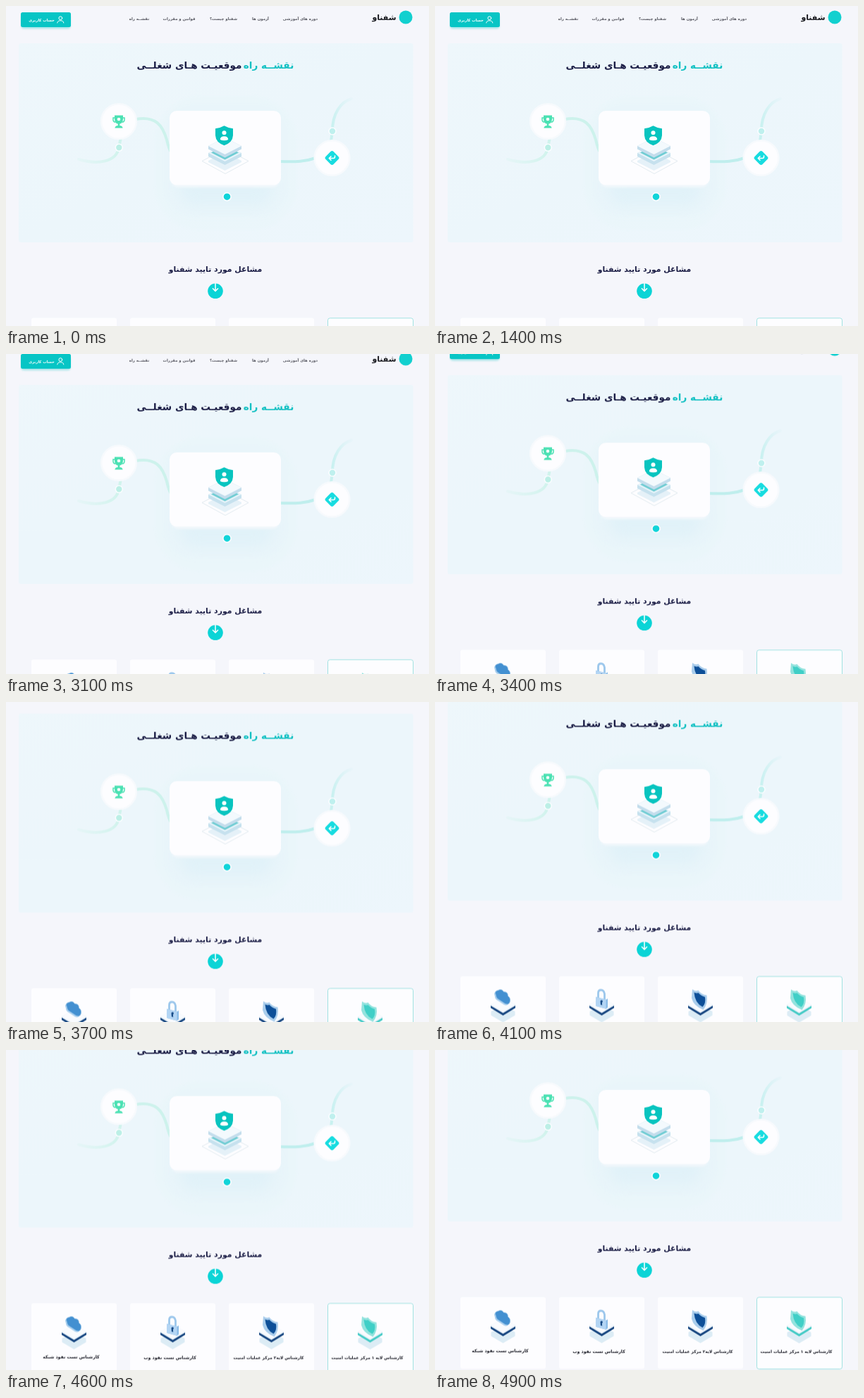
These frames come from a looping animation (600 by 455 pixels, 5 s). An HTML page:

```html
<!DOCTYPE html>
<html lang="fa">
<head>
<meta charset="utf-8">
<title>نقشه راه</title>
<style>
html, body { margin: 0; width: 100%; height: 100%; overflow: hidden; background: #f5f6fb; }
svg { display: block; width: 600px; height: 455px; }
text { font-family: "DejaVu Sans", sans-serif; font-weight: 700; direction: rtl; text-anchor: middle; fill: #1b1d45; }
.nav text { font-size: 5.4px; fill: #55565f; }
.title { font-size: 13.6px; }
.job text { font-size: 6.2px; fill: #1a1b25; }
.job .long { font-size: 5.8px; }
.card { fill: #fdfdff; }
.line { fill: none; stroke-width: 4; stroke-linecap: round; }
.white { fill: none; stroke: #fff; stroke-linecap: round; stroke-linejoin: round; }
#page { animation: scroll 5s infinite; }
@keyframes scroll {
  0% { transform: translateY(0); }
  58% { transform: translateY(0); animation-timing-function: steps(8); }
  74% { transform: translateY(-36.5px); animation-timing-function: steps(4); }
  82% { transform: translateY(-53.5px); animation-timing-function: steps(5); }
  92% { transform: translateY(-83.5px); animation-timing-function: steps(3); }
  98%, 100% { transform: translateY(-92.3px); }
}
</style>
</head>
<body>
<svg viewBox="0 0 600 455">
  <defs>
    <linearGradient id="hero" x2="1" y2="1">
      <stop offset="0" stop-color="#eef7fb"/>
      <stop offset=".5" stop-color="#ecf6fb"/>
      <stop offset="1" stop-color="#edf6fc"/>
    </linearGradient>
    <linearGradient id="fadeL" gradientUnits="userSpaceOnUse" x1="102" x2="165">
      <stop offset="0" stop-color="#d6f4ef" stop-opacity=".3"/>
      <stop offset="1" stop-color="#cff3ec"/>
    </linearGradient>
    <linearGradient id="fadeR" gradientUnits="userSpaceOnUse" x1="462" x2="492">
      <stop offset="0" stop-color="#c8f1f0"/>
      <stop offset="1" stop-color="#e0f3f8" stop-opacity=".3"/>
    </linearGradient>
    <filter id="blur" x="-50%" y="-100%" width="200%" height="300%"><feGaussianBlur stdDeviation="10"/></filter>
    <filter id="soft" x="-20%" y="-50%" width="140%" height="200%"><feGaussianBlur stdDeviation="1.8"/></filter>

    <!-- slab under each job icon; its band takes the current colour -->
    <g id="slab">
      <path d="M-17 50 0 41 17 50V55.5L0 65.5-17 55.5Z" fill="#dcecf5"/>
      <path d="M-17.5 41 0 51.5 17.5 41V45L0 55.8-17.5 45Z" fill="currentColor"/>
      <path d="M-17.5 40 0 30.5 17.5 40V41.8L0 52.3-17.5 41.8Z" fill="#e6f0f8"/>
      <path d="M-17.5 40 0 30.5 17.5 40 0 50.5Z" fill="#f9fbfe"/>
    </g>
    <g id="guard">
      <path d="M-11.5 18.5Q-7 22-3 20Q1 26 9 27Q11 39 4 47.5Q-10 42-12.5 31Z"/>
      <path d="M-9 23Q-5 24.5-3 23.5Q1 28 6.5 29.5Q8 39 3 43.5Q-8 38-9 23Z" fill="currentColor"/>
    </g>
    <rect id="tile" width="121" height="102" rx="3"/>
  </defs>

  <g id="page">
    <!-- header -->
    <rect x="22" y="13" width="69" height="19" rx="3" fill="#07c5c5" opacity=".4" filter="url(#soft)"/>
    <rect x="21" y="9" width="71" height="21" rx="2.5" fill="#07c5c5"/>
    <text x="50.5" y="21.6" font-size="5.3" style="fill:#fff">حساب کاربری</text>
    <circle cx="77.3" cy="17.2" r="2.4" class="white" stroke-width="1"/>
    <path d="M72.8 24Q73 20.8 77.3 20.8T81.8 24" class="white" stroke-width="1"/>
    <g class="nav">
      <text x="189" y="19.5">نقشــه راه</text>
      <text x="245.5" y="19.5">قوانین و مقررات</text>
      <text x="308.5" y="19.5">شفناو چیست؟</text>
      <text x="361" y="19.5">آزمون ها</text>
      <text x="417.5" y="19.5">دوره های آموزشی</text>
    </g>
    <text x="536.5" y="19.5" font-size="11" style="fill:#17181d">شفناو</text>
    <circle cx="567" cy="16" r="9.5" fill="#12d0cf"/>

    <!-- hero -->
    <rect x="18" y="53" width="559.5" height="283" rx="3" fill="url(#hero)"/>
    <text class="title" x="372.5" y="88.5" style="fill:#14c1c3">نقشــه راه</text>
    <text class="title" x="260" y="88.5">موقعیـت هـای شغلــی</text>

    <rect x="210" y="127" width="204" height="193" rx="66" fill="#e9f6fa" opacity=".45" filter="url(#soft)"/>
    <rect x="222" y="138" width="180" height="162" rx="42" fill="#e8f5fa" opacity=".4" filter="url(#soft)"/>
    <rect x="246" y="228" width="132" height="56" rx="22" fill="#dcf0f8" opacity=".6" filter="url(#blur)"/>

    <path class="line" d="M103 218C130 226 157 222 160 201L163 187" stroke="url(#fadeL)"/>
    <path class="line" d="M184 161C213 156 222 170 228 190Q231 204 235 209" stroke="#cdf2ec"/>
    <path class="line" d="M388 221C412 221.8 425 221.2 441 215.5" stroke="#bfeeed"/>
    <path class="line" d="M461 192 463 178C463 153 475 136 490 132" stroke="url(#fadeR)"/>

    <rect x="234" y="156" width="154" height="102" rx="10" fill="#f2f8fc" filter="url(#soft)"/>
    <rect class="card" x="232" y="149" width="158" height="105.5" rx="10"/>

    <g class="card" stroke="#f7fafd" stroke-width="2.5">
      <circle cx="160" cy="164" r="24.8"/>
      <circle cx="462.5" cy="216" r="24.8"/>
    </g>
    <g stroke="#fafdff" stroke-width="1.6">
      <circle cx="160.3" cy="201.3" r="5" fill="#bcefe6"/>
      <circle cx="463" cy="178" r="5" fill="#bff0ee"/>
      <circle cx="313.5" cy="271.2" r="5.6" fill="#10d4d9"/>
    </g>

    <!-- trophy -->
    <g fill="#4be1b3">
      <path d="M154 155.5H166V161Q165.5 167 161.3 167.6V170.3H163Q165.3 171 165.7 173.5H154.3Q154.7 171 157 170.3H158.7V167.6Q154.5 167 154 161Z"/>
      <path d="M154 159H152V162Q152.2 165 155 165.2M166 159H168V162Q167.8 165 165 165.2" fill="none" stroke="#4be1b3" stroke-width="1.5"/>
      <circle cx="160" cy="161" r="2.3" fill="#fdfdff"/>
    </g>

    <!-- signpost -->
    <rect x="454.7" y="208.2" width="15.6" height="15.6" rx="3" fill="#17dce0" transform="rotate(45 462.5 216)"/>
    <path class="white" d="M466.5 213V214.5Q466.5 216.5 464.5 216.5H458.5M461 213.7 458.2 216.5 461 219.3" stroke-width="1.5"/>

    <!-- layered stack -->
    <path d="M278 220.5 311 203 344 220.5 311 238.5Z" fill="none" stroke="#dce6ec" stroke-width=".8"/>
    <path d="M287 220 310.5 208 334 220V222L310.5 234 287 222Z" fill="#e5f1f8"/>
    <path d="M287 209 310.5 198 334 209V214L310.5 226 287 214Z" fill="#c6e1ee"/>
    <path d="M287 209 310.5 198 334 209 310.5 221Z" fill="#e6f4fa"/>
    <path d="M291 208.5 310.5 198.5 330 208.5 310.5 218.5Z" fill="#6fccd3"/>
    <path d="M287 199 310.5 187 334 199V203.5L310.5 215.5 287 203.5Z" fill="#c3ddec"/>
    <path d="M287 199 310.5 187 334 199 310.5 211Z" fill="#f3f9fd"/>
    <path d="M309.5 170.3Q315 173.5 322 174.3V184Q321.5 194 309.5 198.2Q297.5 194 297 184V174.3Q304 173.5 309.5 170.3Z" fill="#08c4bf"/>
    <circle cx="309.5" cy="180.3" r="3" fill="#fff"/>
    <path d="M303.8 190Q303.8 185.3 309.5 185.3T315.2 190Q313 191.2 309.5 191.2T303.8 190Z" fill="#fff"/>

    <!-- section heading -->
    <text x="297" y="377.5" font-size="10.9">مشاغل مورد تایید شفناو</text>
    <circle cx="297" cy="405.3" r="10.8" fill="#0bd4d6"/>
    <path class="white" d="M297 394.5V405M293.4 401.8 297 405.4 300.6 401.8" stroke-width="1.5"/>

    <!-- job cards -->
    <g class="job" transform="translate(36 443.5)">
      <use href="#tile" class="card"/>
      <g transform="translate(60.5 0)">
        <use href="#slab" color="#174680"/>
        <path id="cloud" d="M-10 27Q-13 21-7 20Q-2 17 1 22Q7 22 7 28Q12 32 9 38Q7 41 3 39L-6 33Q-10 31-10 27Z" fill="#aed2ef" transform="translate(-1.6 1.4)"/>
        <path d="M-10 27Q-13 21-7 20Q-2 17 1 22Q7 22 7 28Q12 32 9 38Q7 41 3 39L-6 33Q-10 31-10 27Z" fill="#4390d1" stroke="#8fbfe6" stroke-width=".7"/>
        <text x="-4" y="78.6">کارشناس تست نفوذ شبکه</text>
      </g>
    </g>
    <g class="job" transform="translate(176 443.5)">
      <use href="#tile" class="card"/>
      <g transform="translate(60.5 0)">
        <use href="#slab" color="#174680"/>
        <path d="M-5 32V24Q-5 19.5-1 19.5T4 25V33" fill="none" stroke="#9cc7ec" stroke-width="2.8"/>
        <path d="M-8.5 29.3 6 33.3 8.5 31.8V44.3L6 46.3-8.5 42.3Z" fill="#8abce8"/>
        <path d="M-8.5 29.3 6 33.3V46.3L-8.5 42.3Z" fill="#b3d5f4"/>
        <path d="M-2 35.8A1.7 1.7 0 1 1 .4 37.2L.7 41.1-1.6 40.5Z" fill="#164b88"/>
        <text x="-4" y="79.3">کارشناس تست نفوذ وب</text>
      </g>
    </g>
    <g class="job" transform="translate(316 443.5)">
      <use href="#tile" class="card"/>
      <g transform="translate(60.5 0)">
        <use href="#slab" color="#174680"/>
        <use href="#guard" color="#0d4f98" fill="#a9cdec"/>
        <text class="long" x="-4" y="79.8">کارشناس لایه۲ مرکز عملیات امنیت</text>
      </g>
    </g>
    <g class="job" transform="translate(456.5 443.8)">
      <use href="#tile" class="card" stroke="#a0e2e1"/>
      <g transform="translate(60 0)">
        <use href="#slab" color="#45cbc6"/>
        <use href="#guard" color="#40cfc7" fill="#93e3de"/>
        <text class="long" x="-4" y="79.1">کارشناس لایه ۱ مرکز عملیات امنیت</text>
      </g>
    </g>
  </g>
</svg>
</body>
</html>
```
